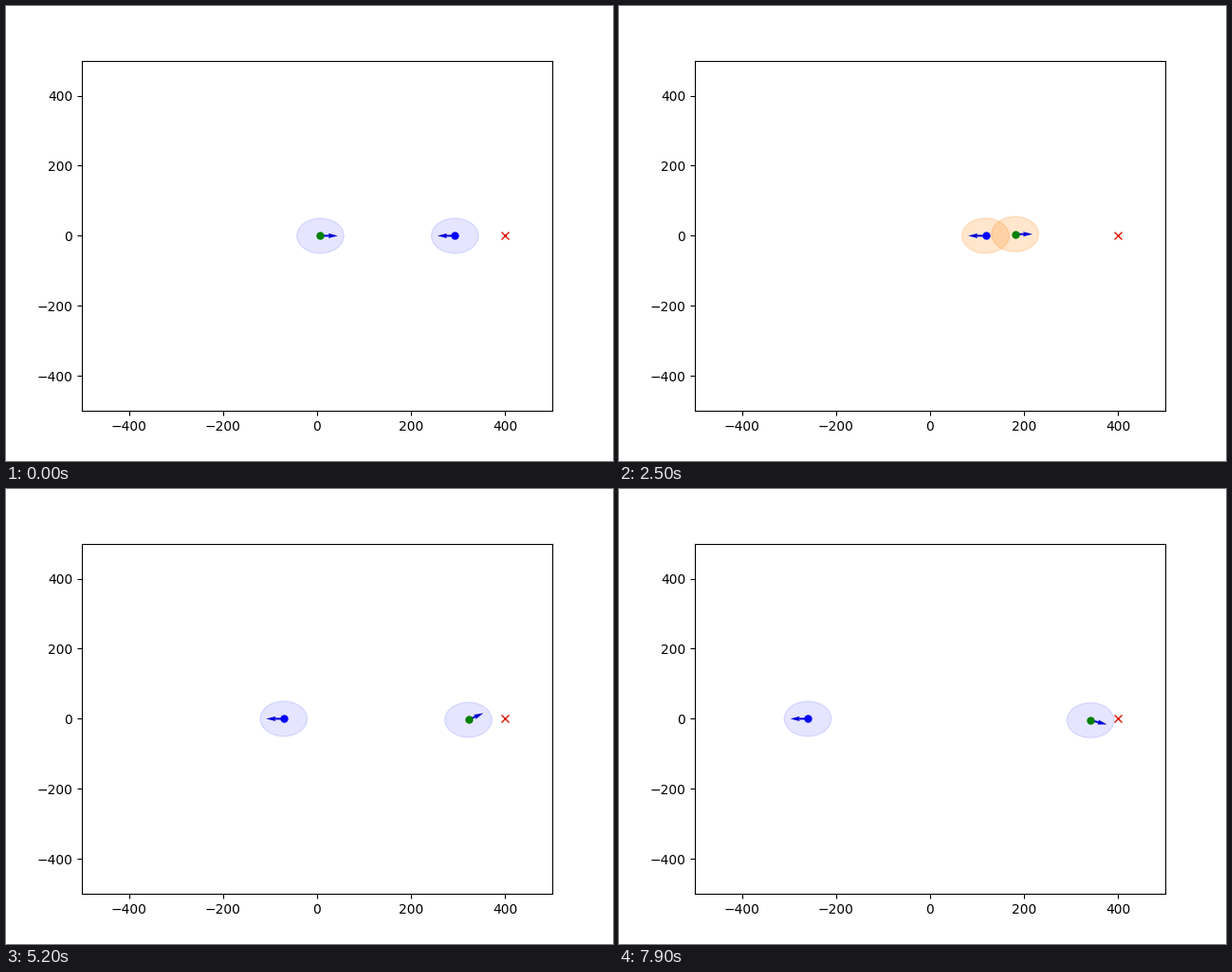
These frames come from a looping animation (640x480 px, 8000 ms). A matplotlib script:

```python
import numpy as np
import matplotlib.pyplot as plt
from matplotlib.animation import FuncAnimation
from matplotlib.patches import Circle

FRAMES, INTERVAL = 80, 100
STEP = 7              # blue's distance per frame
CRUISE = 6.95         # green's distance per frame before braking
STOP, DECAY = 343, 11.5
RADIUS = 50           # safety zone
ARROW = 37            # heading arrow length
GOAL = (400, 0)
CLEAR, CLOSE = (0, 0, 1, 0.1), (1, 0.56, 0.12, 0.22)

fig, ax = plt.subplots(figsize=(6.4, 4.8), dpi=100)
ax.set_xlim(-500, 500)
ax.set_ylim(-500, 500)

# dots per data unit on each axis
scale = np.array([ax.bbox.width, ax.bbox.height]) / 1000

zones = [ax.add_patch(Circle((0, 0), RADIUS, lw=1)) for _ in range(2)]
arrows = ax.quiver([0, 0], [0, 0], [1, 1], [0, 0], color="#0000d8",
                   units="dots", width=2, scale_units="dots", scale=1,
                   headwidth=2.6, headlength=5, zorder=2.5)
ax.plot(*GOAL, "x", color="#e01800", zorder=3)
blue_dot, = ax.plot([], [], "o", color="blue", ms=5, zorder=3)
green_dot, = ax.plot([], [], "o", color="green", ms=5, zorder=3)


def green_pos(n):
    """Cruise, sidestep the oncoming agent, then brake exponentially."""
    brake = CRUISE * DECAY
    start = (STOP - brake) / CRUISE - 1
    if n < start:
        x = CRUISE * (n + 1)
    else:
        x = STOP - brake * np.exp((start - n) / DECAY)
    y = 6 * np.exp(-((n - 23) / 4) ** 2) - 0.6 * np.sqrt(max(0, n - 28))
    return np.array([x, y])


def green_heading(n):
    """Straight ahead, a quick swerve, then a wide slow weave."""
    if n < 15:
        return 0
    if n < 35:
        return np.radians(11) * np.sin(2 * np.pi * (n - 15) / 20)
    return np.radians(31) * np.sin(2 * np.pi * (n - 35) / 73)


def update(n):
    green = green_pos(n)
    blue = np.array([300 - STEP * (n + 1), 0])
    near = np.hypot(*(green - blue)) < 2 * RADIUS
    for zone, pos in zip(zones, (green, blue)):
        zone.center = pos
        zone.set_color(CLOSE if near else CLEAR)

    angles = np.array([green_heading(n), np.pi])
    arrows.set_offsets([green, blue])
    arrows.set_UVC(ARROW * scale[0] * np.cos(angles),
                   ARROW * scale[1] * np.sin(angles))
    green_dot.set_data([green[0]], [green[1]])
    blue_dot.set_data([blue[0]], [blue[1]])
    return [*zones, arrows, green_dot, blue_dot]


anim = FuncAnimation(fig, update, frames=FRAMES, interval=INTERVAL,
                     repeat=True, repeat_delay=0, blit=False)
plt.show()
```
